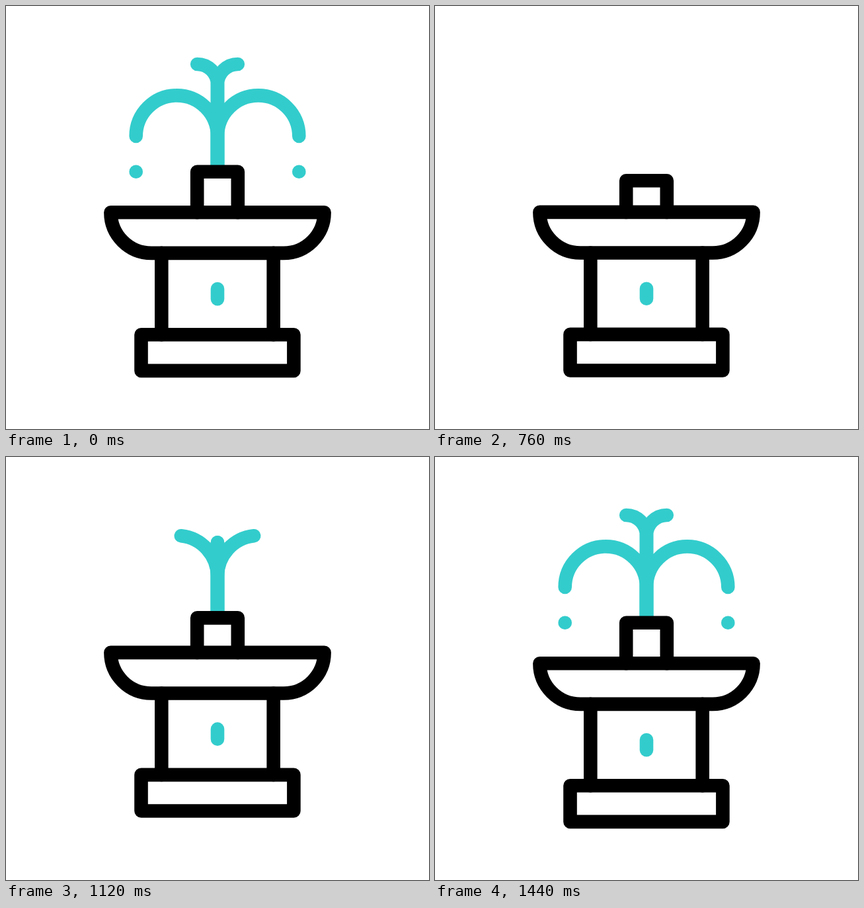
Write an HTML page that moves like this. It is 640 by 640 pixels and loops after 1.52 s.

```html
<!DOCTYPE html>
<html lang="en">
<head>
<meta charset="utf-8">
<title>Fountain</title>
<style>
  html, body { margin: 0; width: 100%; height: 100%; overflow: hidden; background: #fff; }
  svg { display: block; width: 100%; height: 100%; }
  path, circle { fill: none; stroke-width: 20.6; stroke-linecap: round; stroke-linejoin: round; }
  .water path, .drip { stroke: #33cccc; }
  .water circle { fill: #33cccc; }
  .stone { stroke: #000; }
  #nozzle { fill: #fff; }
</style>
</head>
<body>
<svg viewBox="0 0 640 640">
  <g id="fountain">
    <g class="water">
      <path class="jet" pathLength="1" d="M320 250.7V197A61.65 61.65 0 0 0 196.7 197"/>
      <path class="jet" pathLength="1" d="M320 250.7V197A61.65 61.65 0 0 1 443.3 197"/>
      <path class="jet" pathLength="1" d="M320 250.7V118.8A30.8 30.8 0 0 0 289.2 88"/>
      <path class="jet" pathLength="1" d="M320 250.7V118.8A30.8 30.8 0 0 1 350.8 88"/>
      <circle class="drop" cx="196.7" cy="250.7" r="10.3"/>
      <circle class="drop" cx="443.3" cy="250.7" r="10.3"/>
    </g>
    <path id="nozzle" class="stone"/>
    <path class="stone" d="M158.4 312.3H481.6A61.6 61.6 0 0 1 420 373.9H220A61.6 61.6 0 0 1 158.4 312.3Z"/>
    <path class="stone" d="M235.3 373.9V497.3M404.7 373.9V497.3"/>
    <path class="stone" d="M204.5 497.3H435.4V551.9H204.5Z"/>
    <path class="drip" d="M320 428.1V443.2"/>
  </g>
</svg>
<script>
  const LOOP = 1520, STEP = 40;
  const fountain = document.getElementById('fountain');
  const nozzle = document.getElementById('nozzle');
  const jets = document.querySelectorAll('.jet');
  const drops = document.querySelectorAll('.drop');

  // [time, value] keys, eased between neighbours
  const HOP = [[730, 0], [1067, -17.7], [1392, 0]];
  const SQUEEZE = [[622, 0], [750, 14.2], [942, -12.8], [1104, 9.3], [1310, 0]];
  const DROP_SIZE = [[520, 1], [660, 0], [1150, 0], [1260, 1]];

  const clamp = u => Math.min(1, Math.max(0, u));
  const ease = u => u * u * (3 - 2 * u);
  const span = (t, from, to) => clamp((t - from) / (to - from));

  function track(t, keys) {
    let v = keys[0][1];
    for (let i = 1; i < keys.length; i++) {
      const [t0, v0] = keys[i - 1], [t1, v1] = keys[i];
      if (t >= t0) v = v0 + (v1 - v0) * ease(span(t, t0, t1));
    }
    return v;
  }

  function rise(t) {
    const u = span(t, 873, 1330);
    return ease(u) + 0.35 * (u * (1 - u)) ** 2;
  }

  function trim(path, from, to) {
    const len = to - from;
    path.style.visibility = len > 0.001 ? 'visible' : 'hidden';
    path.setAttribute('stroke-dasharray', `${len} 2`);
    path.setAttribute('stroke-dashoffset', -from);
  }

  function draw(t) {
    const filling = t > 700;
    const from = filling ? 0 : ease(span(t, 92, 551));
    const to = filling ? rise(t) : 1;

    fountain.setAttribute('transform', `translate(0 ${track(t, HOP)})`);
    nozzle.setAttribute('d', `M289.2 312.3V${250.7 + track(t, SQUEEZE)}H350.8V312.3`);
    jets.forEach(jet => trim(jet, from, to));

    const size = track(t, DROP_SIZE);
    const lift = filling ? 220 * (1 - to) : 0;
    drops.forEach(drop => {
      drop.setAttribute('r', 10.3 * size);
      drop.setAttribute('cy', 250.7 - lift);
    });
  }

  function tick() {
    const t = performance.now() % LOOP;
    draw(Math.floor(t / STEP) * STEP);
    requestAnimationFrame(tick);
  }
  tick();
</script>
</body>
</html>
```
